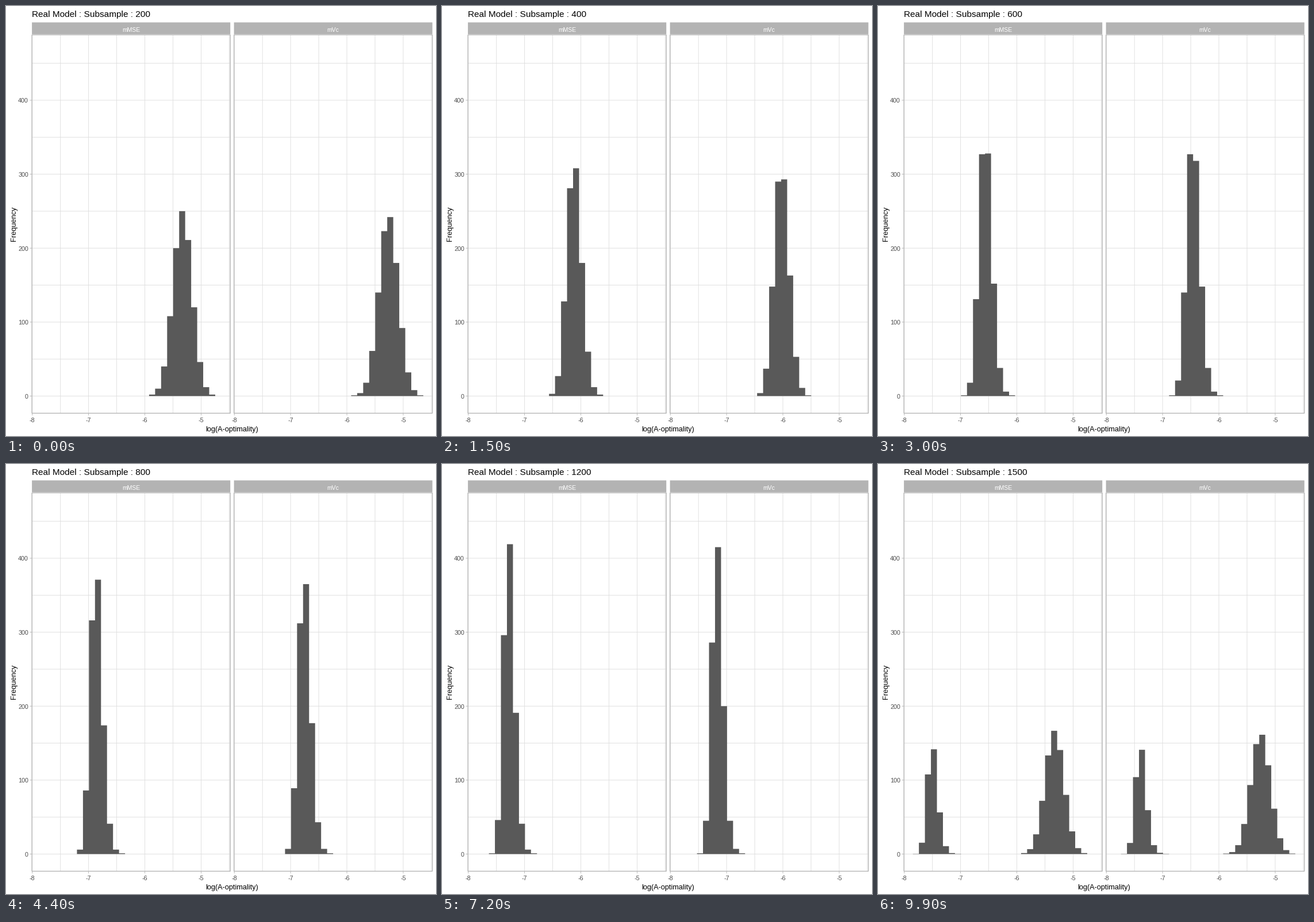
Animation, 748 px wide and 748 px high, one loop 10000 ms. Source, as a matplotlib script:

```python
import math

import matplotlib.pyplot as plt
import numpy as np
from matplotlib.animation import FuncAnimation
from matplotlib.patches import Rectangle

SIZE, DPI = 748, 72
FRAMES, INTERVAL = 100, 100
BINS, TOTAL = 30, 1000
SIZES = range(200, 1600, 100)

LEFT, WIDTH, TOP, BOTTOM = 45.1, 345.1, 50.2, 708.4
OFFSET = 351.5                    # distance between the two panels
TICK_X, UNIT_X = 45.7, 97.9       # place of -8, pixels per unit
BIN_X, BIN_W = 60.7, 10.457
ZERO_Y, UNIT_Y = 678.5, 1.2864
GREY, GRID, BAR, TICK_TEXT = "#B3B3B3", "#DEDEDE", "#595959", "#4D4D4D"

# panel name, then mean (quadratic in log size) and starting spread, in bins
PANELS = [("mMSE", (23.565, -10.9, 0.425), 1.57),
          ("mVc", (24.218, -10.5, 0.32), 1.60)]


def histogram(n, mean, spread):
    """Counts of a slightly skewed normal sample that narrows as n grows."""
    x = math.log(n / SIZES[0])
    mu = mean[0] + mean[1] * x + mean[2] * x * x
    sd = spread * math.exp(-0.41 * x + 0.05 * x * x)
    z = (np.arange(BINS + 1) - mu) / sd
    z = z - 0.2 * x / 6 * (z * z - 1)
    cdf = np.array([0.5 + 0.5 * math.erf(v / math.sqrt(2)) for v in z])
    return np.rint(TOTAL * np.diff(cdf)).clip(0)


STATES = np.array([[histogram(n, mean, spread) for _, mean, spread in PANELS]
                   for n in SIZES])

# each state holds, then moves on linearly over 4 steps (first three) or 3
knots, levels = [0], [0]
start = 4
for i in range(len(SIZES)):
    steps = 4 if i < 3 else 3
    knots += [start - 1, start - 1 + steps]
    levels += [i, i + 1]
    start += 8 if i < 3 else 7

plt.rcParams["font.family"] = "Liberation Sans"
fig = plt.figure(figsize=(SIZE / DPI, SIZE / DPI), dpi=DPI, facecolor="white")
ax = fig.add_axes([0, 0, 1, 1])
ax.set_xlim(0, SIZE)
ax.set_ylim(SIZE, 0)
ax.axis("off")


def line(x0, y0, x1, y1, color, z=1):
    ax.plot([x0, x1], [y0, y1], color=color, lw=0.9, zorder=z, snap=False,
            solid_capstyle="butt")


def box(x, y, w, h, z, **style):
    ax.add_patch(Rectangle((x, y), w, h, zorder=z, snap=False, **style))


def label(x, y, s, size, color="black", ha="center", va="baseline", **kw):
    return ax.text(x, y, s, fontsize=size, color=color, ha=ha, va=va,
                   zorder=5, **kw)


def height(count):
    return ZERO_Y - UNIT_Y * count


def draw_panel(dx, name):
    left, right = LEFT + dx, LEFT + dx + WIDTH
    box(left, 28.5, WIDTH, 20.7, 1, facecolor=GREY, lw=0)
    label((left + right) / 2, 45, name, 10.4, "white")
    for count in range(0, 500, 50):
        line(left, height(count), right, height(count), GRID)
    for k in range(8):
        x = TICK_X + dx + UNIT_X * k / 2
        line(x, TOP, x, BOTTOM, GRID)
        if k % 2 == 0:
            line(x, BOTTOM, x, BOTTOM + 3.7, GREY)
            label(x, 724, str(k // 2 - 8), 10.8, TICK_TEXT)
    box(left, TOP, WIDTH, BOTTOM - TOP, 4, fill=False, edgecolor=GREY, lw=1.3)
    edges = BIN_X + dx + BIN_W * np.arange(BINS + 1)
    bars = ax.stairs(np.full(BINS, ZERO_Y), edges, baseline=ZERO_Y, fill=True,
                     color=BAR, lw=0, zorder=3)
    bars.set_snap(False)
    return bars


bars = [draw_panel(OFFSET * i, name) for i, (name, *_) in enumerate(PANELS)]
for count in range(0, 500, 100):
    line(LEFT - 3.7, height(count), LEFT, height(count), GREY)
    label(39, height(count) + 4.5, str(count), 10.8, TICK_TEXT, "right")
label(393.2, 740, "log(A-optimality)", 12.6)
label(13.6, 379.3, "Frequency", 12.7, va="center", rotation=90)
title = label(45, 19, "", 15.4, ha="left")


def update(frame):
    pos = np.interp(frame, knots, levels) + 1e-9
    i = int(pos)
    w = pos - i
    counts = (1 - w) * STATES[i] + w * STATES[(i + 1) % len(SIZES)]
    for group, values in zip(bars, counts):
        group.set_data(values=height(values))
    title.set_text(f"Real Model : Subsample : {SIZES[i]}")
    return [title, *bars]


anim = FuncAnimation(fig, update, frames=FRAMES, interval=INTERVAL, repeat=True,
                     repeat_delay=0, blit=False)
plt.show()
```
